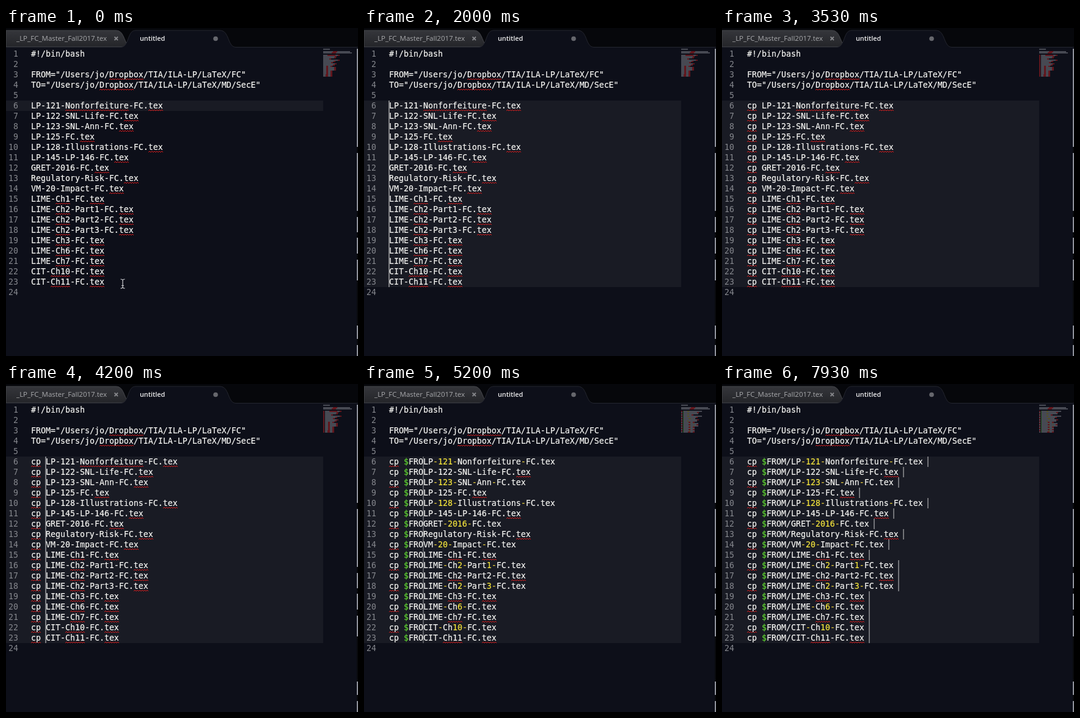
These frames come from a looping animation (576x538 px, 8000 ms). An HTML page:

```html
<!DOCTYPE html>
<html lang="en">
<head>
<meta charset="utf-8">
<title>Multiple carets</title>
<style>
  html, body { margin: 0; width: 100%; height: 100%; overflow: hidden; background: #0d0f19; }
  svg { display: block; width: 576px; height: 538px; }
  .code { font: 13.289px "DejaVu Sans Mono", monospace; white-space: pre; fill: #f6f6f3; stroke: #f6f6f3; stroke-width: .2; }
  .num { font: 13.289px "DejaVu Sans Mono", monospace; fill: #85878d; text-anchor: end; }
  .tab { font-family: "Open Sans", "Noto Sans", sans-serif; }
  .math { fill: #f5e53c; stroke: #f5e53c; }
  .dash { fill: #dfc53a; stroke: #dfc53a; }
  .dollar { fill: #5fd331; stroke: #5fd331; }
  .wave { fill: none; stroke: #d41c1c; stroke-width: 1; }
</style>
</head>
<body>
<svg viewBox="0 0 576 538">
  <defs>
    <linearGradient id="tabFill" x2="0" y2="1">
      <stop stop-color="#35363b"/><stop offset="1" stop-color="#242529"/>
    </linearGradient>
  </defs>
  <rect width="576" height="538" fill="#0d0f19"/>
  <rect width="576" height="33" fill="#06070b"/>
  <path d="M0 4H180C196 4 192 31 206 31H0Z" fill="url(#tabFill)" stroke="#47484d"/>
  <path d="M0 33V31.500H188C202 31 198 4 212 4H350C366 4 362 31 376 31.500H576V33Z" fill="#0d0f19"/>
  <path d="M0 31.500H188C202 31 198 4 212 4H350C366 4 362 31 376 31.500H576" fill="none" stroke="#24262f"/>
  <text class="tab" x="17" y="21" font-size="11.500" fill="#a9aaad">_LP_FC_Master_Fall2017.tex</text>
  <path d="M177.500 14.500l5.500 5.500m0-5.500l-5.500 5.500" stroke="#85868a" stroke-width="1.800"/>
  <text class="tab" x="219" y="21" font-size="10.800" font-weight="600" fill="#eeeeef">untitled</text>
  <circle cx="343" cy="17.500" r="3.800" fill="#66676d"/>
  <rect x="574" y="34" width="2" height="504" fill="#8f929b"/>
  <path d="M575 195v10m0 95v10m0 25v9m0 26v10m0 34v74m0 22v10" stroke="#08090d" stroke-width="2"/>
  <g id="doc"></g>
  <g id="carets" fill="#e2e2e2"></g>
  <g id="ibeam" fill="none" stroke="#c9cace" stroke-width="1.200">
    <path d="M-3.500-7.500Q0-7.500 0-5V5Q0 7.500-3.500 7.500M3.500-7.500Q0-7.500 0-5M0 5Q0 7.500 3.500 7.500M-2 3H2"/>
  </g>
  <path id="arrow" d="M174 411V424.500L177 421.700L179.300 427L181.800 426L179.500 420.800H183.500Z" fill="#15161c" stroke="#e4e4e4" stroke-width="1.100"/>
</svg>
<script>
const LOOP = 8000, LEFT = 41, CHAR = 8, ROW = 17, FIRST = 6, MINI = 519;
const header = ['#!/bin/bash', '', 'FROM="/Users/jo/Dropbox/TIA/ILA-LP/LaTeX/FC"',
  'TO="/Users/jo/Dropbox/TIA/ILA-LP/LaTeX/MD/SecE"', ''];
const files = ('LP-121-Nonforfeiture LP-122-SNL-Life LP-123-SNL-Ann LP-125 LP-128-Illustrations ' +
  'LP-145-LP-146 GRET-2016 Regulatory-Risk VM-20-Impact LIME-Ch1 LIME-Ch2-Part1 LIME-Ch2-Part2 ' +
  'LIME-Ch2-Part3 LIME-Ch3 LIME-Ch6 LIME-Ch7 CIT-Ch10 CIT-Ch11').split(' ').map(f => f + '-FC.tex');
const LAST = FIRST + files.length - 1;

// Time of each keystroke and the text typed before the file name so far
const typed = [[0, ''], [2330, 'c'], [2470, 'cp'], [2870, 'cp '], [4330, 'cp $'], [4470, 'cp $F'],
  [4600, 'cp $FR'], [4730, 'cp $FRO'], [5330, 'cp $FROM'], [5670, 'cp $FROM/']];
const SELECT = 330, SPLIT = 800, HOME = 1730, END = 6130, SPACE = 6670;

// Caret opacity over time; equal times are hard changes
const blink = [[0, 0], [330, 0], [330, 1], [1530, 1], [1730, .2], [1730, 1], [2000, 1], [2200, 0],
  [2330, 0], [2330, 1], [2730, 1], [2870, .4], [2870, 1], [3270, 1], [3530, 0], [3870, 0], [4130, 1],
  [5130, 1], [5330, 0], [5330, 1], [5930, 1], [6070, .5], [6130, .5], [6130, 1], [6470, 1],
  [6670, .1], [6670, 1], [7070, 1], [7270, 0], [7670, 0], [7930, .9], [8000, .9]];

const el = id => document.getElementById(id);
const top_ = n => 34 + ROW * (n - 1);
const rect = (x, y, w, h, fill) => `<rect x="${x}" y="${y}" width="${w}" height="${h}" fill="${fill}"/>`;
const lastBefore = (list, t) => list.filter(k => k[0] <= t).pop();

function ramp(keys, t) {
  const i = keys.findIndex(k => k[0] > t);
  if (i < 1) return keys[keys.length - 1][1];
  const [t0, a] = keys[i - 1], [t1, b] = keys[i];
  return a + (b - a) * (t - t0) / (t1 - t0);
}

// Each dollar sign toggles math mode, which runs on across lines
function tokens(line, state) {
  return (line.match(/\$|-|\d+|[A-Za-z]+\d*|\s+|./g) || []).flatMap(part => {
    if (part === '$') {
      state.math = !state.math;
      return [{ text: part, kind: 'dollar' }];
    }
    if (!state.math) return [{ text: part, bad: /^(Dropbox|Nonforfeiture|tex|Ch\d+|cp)$/.test(part) }];
    return part.match(/\d+|\D+/g).map(text =>
      ({ text, kind: /\d/.test(text) ? 'math' : text === '-' ? 'dash' : '' }));
  });
}

function wave(x, y, chars) {
  return `<path class="wave" d="M${x} ${y + 1}${'l2-2l2 2'.repeat(chars * 2)}"/>`;
}

function drawLine(n, line, state, selected) {
  const y = top_(n), miniY = 34 + 2 * (n - 1);
  let col = 0, spans = '', marks = '', mini = '';
  if (selected) {
    marks += rect(LEFT - .5, y, line.length * CHAR + .5, ROW, '#22386f') +
      `<path d="M${LEFT} ${y + 16.5}h${line.length * CHAR}" stroke="#304a84" stroke-width=".7"/>`;
    mini += rect(MINI, miniY, line.length, 2, '#2b4686');
  }
  for (const { text, kind, bad } of tokens(line, state)) {
    spans += `<tspan class="${kind || ''}">${text}</tspan>`;
    if (bad && !selected) marks += wave(LEFT + col * CHAR, y + 16, text.length);
    if (text.trim()) {
      const tint = bad && !selected ? '#a51d22' : { dollar: '#3f8428', math: '#8e8630' }[kind] || '#777982';
      mini += rect(MINI + col, miniY + .3, text.length, 1.1, tint);
    }
    col += text.length;
  }
  return marks + `<text class="code" x="${LEFT}" y="${y + 13}">${spans}</text>` + mini;
}

function drawDocument(prefix, suffix, mode) {
  const state = { math: false };
  const lines = [...header, ...files.map(f => prefix + f + suffix), ''];
  const selected = mode === 'select' || mode === 'split';
  const from = mode === 'select' ? LAST : FIRST;
  const to = mode === 'single' ? FIRST : LAST;
  let out = rect(0, top_(from), selected ? 36 : MINI, ROW * (to - from + 1), '#191b24');
  lines.forEach((line, i) => {
    const n = i + 1;
    out += `<text class="num" x="20" y="${top_(n) + 13}">${n}</text>`;
    out += drawLine(n, line, state, selected && n >= FIRST && n <= LAST);
  });
  el('doc').innerHTML = out;

  const atEnd = selected || mode === 'end';
  el('carets').innerHTML = files.map((f, i) => {
    const n = FIRST + i, col = prefix.length + (atEnd ? f.length + suffix.length : 0);
    return n < from || n > to ? '' : rect(LEFT + col * CHAR - .5, top_(n), 1, ROW, '#e2e2e2');
  }).join('');
}

let shown = '';
function render(t) {
  const prefix = lastBefore(typed, t)[1], suffix = t >= SPACE ? ' ' : '';
  const mode = lastBefore([[0, 'single'], [SELECT, 'select'], [SPLIT, 'split'], [HOME, 'home'], [END, 'end']], t)[1];
  const key = [prefix, suffix, mode].join('|');
  if (key !== shown) {
    drawDocument(prefix, suffix, mode);
    shown = key;
  }
  el('carets').setAttribute('opacity', ramp(blink, t));

  const move = Math.min(1, Math.max(0, (t - 70) / 300));
  el('ibeam').setAttribute('transform', `translate(${191 - 17 * move} ${419.5 + 2 * move})`);
  el('ibeam').setAttribute('visibility', t < 470 ? 'visible' : 'hidden');
  el('arrow').setAttribute('visibility', t >= 470 && t < HOME ? 'visible' : 'hidden');
}

const start = performance.now();
function tick() {
  render((performance.now() - start) % LOOP);
  requestAnimationFrame(tick);
}
tick();
</script>
</body>
</html>
```
